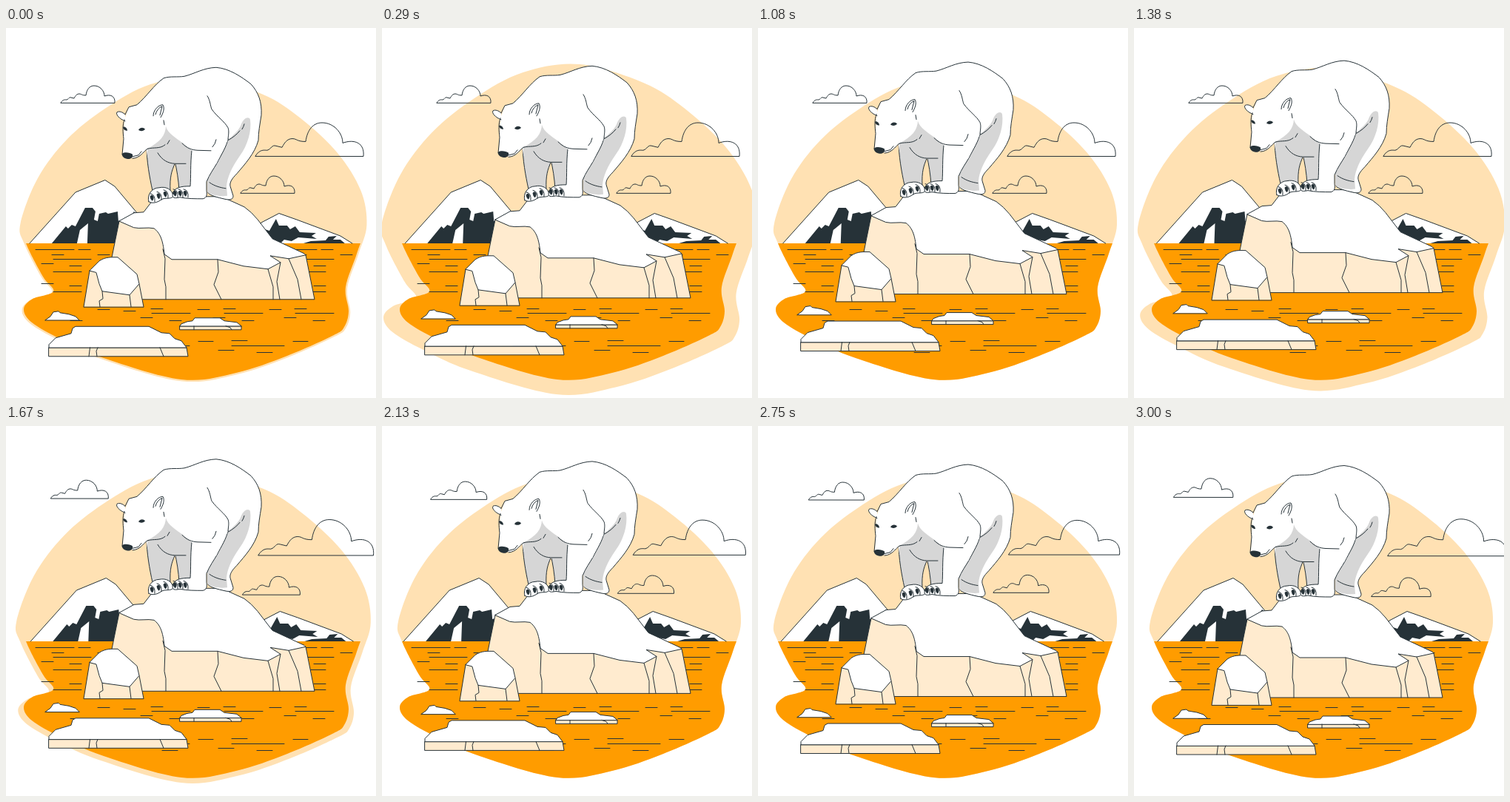
An HTML page for the animation above (3040 ms loop, 500 px wide and 500 px high).

```html
<!DOCTYPE html>
<html lang="en">
<head>
<meta charset="utf-8">
<title>Polar bear on melting ice</title>
<style>
html, body { margin: 0; width: 100%; height: 100%; overflow: hidden; background: #fff; }
svg { display: block; width: 100vw; height: 100vh; }
path { stroke-linecap: round; stroke-linejoin: round; }
.pale { fill: #ffe1b3; }
.sea { fill: #ff9c00; }
.ink { fill: #263238; }
.grey { fill: #d6d6d6; }
.line, .snow, .ice, .shade { stroke: #263238; stroke-width: 1; }
.line { fill: none; }
.snow { fill: #fff; }
.ice { fill: #ffebcf; }
.shade { fill: #d6d6d6; }
.bare { stroke: none; }
.cloud { vector-effect: non-scaling-stroke; }
</style>
</head>
<body>
<svg viewBox="0 0 500 500">
  <defs>
    <path id="land"/>
    <path id="puff" class="line cloud" d="M0 23 C3 18 6 19 8 19 C11 18 11 15 14 16 L18 17 C20 13 22 11 25 11 C28 11 28 13 34 13 C35 5 39 0 45 0 C53 0 59 7 59 14 C67 11 74 14 73 23 Z"/>
    <clipPath id="below"><rect y="291" width="500" height="209"/></clipPath>
  </defs>

  <use href="#land" id="blob" class="pale"/>
  <use href="#land" class="sea" clip-path="url(#below)"/>
  <path id="waves" class="line"/>

  <g id="clouds">
    <use href="#puff" transform="translate(74 78)"/>
    <use href="#puff" transform="translate(337 128) scale(2 1.96)"/>
    <use href="#puff" transform="translate(317 200)"/>
  </g>

  <g id="hills">
    <path class="snow" d="M32 291 L94 222 L134 205.500 L147 214 L184 258 L184 291"/>
    <path class="ink" d="M62 291 L81 268 L84 271 L89 266 L94 268 L107 243 L117 243 L121 248 L119 259 L124 261 L126 251 L135 249 L138 251 L151 248 L152 261 L168 256 L173 248 L186 258 V291 H110 L111 264 L100 273 L96 291 Z"/>
    <path class="snow" d="M330 291 L345 263 L369 250.500 L393 259 L452 281 L468 291"/>
    <path class="ink" d="M340 278 L350 272 L356 274 L365 258 L369 267 L380 267 L384 272 L391 268 L397 276 L419 277 L413 281 L420 285 L395 283 L386 288 L376 286 L372 290 H340 Z M402 291 L412 288 L432 287 L436 282 L447 281 L442 286 L452 286 L458 291 Z"/>
  </g>

  <g id="float">
    <path class="ice" d="M153 261 L143 310 V367 H417 L405 307 L300 290 Z"/>
    <path class="snow" d="M153 261 L173 250 L186 249 L196 236 L215 228 H285 L300 232 L322 242 Q332 249 340 259 L360 285 L403 305 L405 307 L382 312 L357 308 L371 317 L354 326 L321 322 L286 313 H224 L214 306 C212 286 208 277 200 271 C191 269 181 272 173 270 Z"/>
    <path class="line" d="M212 299 L215 312 L214 340 L216 350 V367 M286 313 L287 330 L281 347 L291 367 M371 317 L366 343 L370 367 M354 326 L361 350 V367 M382 312 L394 340 L399 367"/>

    <path class="ice" d="M105 377 L113 328 L150 320 L180 346 L186 377 Z"/>
    <path class="snow" d="M113 328 L126 315 C135 309 143 310 151 310 L177 333 L180 346 L167 361 L130 356 L126 346 L122 331 Z"/>
    <path class="line" d="M130 356 L131 366 L126 369 L127 377 M167 361 L169 377"/>

    <path class="ice" d="M58 432 H244 L246 444 H58 Z"/>
    <path class="snow" d="M58 432 V428 L67 419 L88 413 L90 406 L94 403.500 H193 L210 412 L221 413 L228 420 L237 423 L244 432 Z"/>
    <path class="line" d="M113.500 432 L112 444 M124 432 L122 437 L123 444 M208 432 L213 444"/>

    <path class="ice" d="M235 403 H318 V408 H235 Z"/>
    <path class="snow" d="M235 403 L237 400 L245 397 L252 396 L255 392 H289 L295 396 L312 398 L318 403 Z"/>
    <path class="line" d="M254 403 V408 M297 403 L303 405 L305 408"/>
    <path class="snow" d="M53 395 L60 390 L64 384 L71 383 L73 385 L85 387 L94 390 L99 395 Z"/>

    <!-- far legs -->
    <path class="shade" d="M190 160 C190 180 194 202 198 220 L222 220 C221 202 224 193 228 184"/>
    <path class="shade" d="M228 180 C231 192 233 205 234 220 L252 220 V180"/>
    <!-- trunk and hind leg -->
    <path class="snow" d="M177 104 C191 92 199 78 213 68 C222 65 232 67 241 65.500 C255 62 267 54 284 53.500 C302 55 318 66 331 76 C341 87 346 100 345 118 C343 131 341 141 341 152 C336 170 323 184 312 197 C305 204 302 209 303 214 L307 227 C307 232 303 233 296 231.500 C285 229 277 227 273 223 V206 L254 180"/>
    <path class="snow bare" d="M177 104 L290 80 L299 152 L272 205 L250 184 L228 184 L191 174 L189 160 Z"/>
    <path class="grey" d="M330 124 C328 119 321 122 318 130 C315 139 307 145 299 152 L284 184 L272 206 V222 C280 227 290 228 299 227 L298 214 C299 203 304 190 316 173 C327 158 332 139 330 124 Z"/>
    <path class="grey" d="M216 133 C218 142 230 149 239 156 L251 166 V190 L228 184 L191 175 V162 Z"/>
    <path class="line" d="M205 169 C211 179 219 183 228 183.500 H243 M275 209 C282 214 290 216 297 217 M300 152 C307 148 312 144 316 139 M319 137 Q321 134 322 130"/>
    <!-- paws and near leg -->
    <path class="snow" d="M193 235 C190 226 197 216 207 216 C216 214 225 218 226 228 C222 232 215 229 210 232 C205 236 198 238 193 235 Z"/>
    <path class="snow" d="M251 166 C249 184 250 201 249 214 C238 214 226 215 225 226 C225 231 230 230 235 229 C244 231 256 231 266 231 C271 230 272 226 271 220 V208 C275 198 281 190 285 183 C291 171 298 161 300 150"/>
    <path class="snow bare" d="M251 166 L240 156 L262 110 L277 110 L300 135 L300 151 L284 184 Z"/>
    <path class="line" d="M272 92 C276 98 276 105 278 110 C286 121 295 126 300 135 C302 140 300 147 300 151 M238 156 C245 163 251 165 259 165.500 L277 166 M279 161 Q283 157 284 151"/>
    <path id="toes" class="line"/>
    <path id="claws" class="ink"/>
    <!-- head -->
    <path class="snow bare" d="M160 124 L166 107 L177 104 L207 108 L216 132 C216 145 208 155 191 163 C185 169 181 175 171 176 L158 170 L159 150 Z"/>
    <path class="snow" d="M161 126 C153 123 148 117 150 114 C153 112 158 114 161 117"/>
    <path class="line" d="M161 117 L166 107 L177 104 M160 124 C157 132 158 141 159 150 L157 171 M171 176.500 C181 176 185 168 191 163.500 C200 161 208 164 215 158 M218 157 L221 152 M171 174 L179 172 L183 167"/>
    <path class="snow" d="M199 119 C199 111 206 104 212 104 C215 109 212 116 209 121"/>
    <path class="line" d="M202 117 Q204 109 211 106 L208 118 M213 125 L214 131"/>
    <path class="ink" d="M157 170 C161 167 168 169 171 171 C172 176 168 178 163 177 C159 176 156 173 157 170 Z M158 134 C161 133 164 136 164 139 C161 139 158 137 158 134 Z M179 138 C181 134 186 134 188 137 C186 140 181 140 179 138 Z"/>
  </g>
</svg>
<script>
const byId = id => document.getElementById(id);
const setPath = (id, d) => byId(id).setAttribute('d', d);

// closed smooth curve through key points
function smooth(text) {
  const pts = text.split(' ').map(s => s.split(',').map(Number));
  const n = pts.length;
  const get = i => pts[(i + n) % n];
  const handle = (i, sign) => get(i).map((v, k) => v + sign * (get(i + 1)[k] - get(i - 1)[k]) / 6);
  return `M${pts[0]}` + pts.map((_, i) =>
    `C${handle(i, 1)} ${handle(i + 1, -1)} ${get(i + 1)}`).join('') + 'Z';
}
setPath('land', smooth('22,264 45,204 84,152 136,110 196,78 266,68 345,91 396,123 446,170 ' +
  '477,220 485,266 474,305 459,350 463,383 457,404 443,415 380,443 311,466 237,475 ' +
  '132,446 73,420 35,398 24,380 36,366 64,356 50,336 27,291'));

// each motif is a few dashes (dx, dy, length) repeated at several places
const dash = (x, y, w) => `M${x} ${y + .5}h${w}`;
const repeat = (motif, places) => places.map(([x, y]) =>
  motif.map(([dx, dy, w]) => dash(x + dx, y + dy, w)).join('')).join('');
const horizon = [[0, 0, 52], [58, 0, 16], [22, 7, 16], [84, 7, 16], [24, 13, 51]];
const bank = [[0, 0, 16], [38, 3, 16], [16, 11, 38]];
const middle = [[14, 0, 16], [15, 6, 52], [0, 12, 16], [39, 16, 16]];
const front = [[0, 6, 71], [34, 15, 21], [83, 0, 20]];
setPath('waves',
  repeat(horizon, [[40, 299], [368, 299]]) +
  repeat(bank, [[48, 318], [48, 345], [378, 318], [378, 345]]) +
  repeat(middle, [[182, 379], [280, 379], [376, 379]]) +
  repeat(front, [[177, 423], [305, 423]]) +
  repeat([[0, 0, 16]], [[124, 380], [159, 382], [259, 380], [356, 380], [87, 395]]) +
  repeat([[0, 0, 21]], [[305, 422], [287, 435]]));

// three toes on each front paw
const toes = [0, 1, 2].flatMap(i => [[197 + 9 * i, 230 - 2.5 * i], [228 + 7 * i, 224]]);
setPath('claws', toes.map(([x, y]) =>
  `M${x - 2.5} ${y - 2}q2.500 -4 5 0q.5 4 -2 6q-2.500 -2 -3 -6z`).join(''));
setPath('toes', toes.map(([x, y]) => `M${x - 2} ${y - 6}q7 1 6 11`).join(''));

// motion over one cycle, p from 0 to 1
const tent = (p, peak, rise, fall) =>
  Math.max(0, 1 - (p < peak ? (peak - p) / rise : (p - peak) / fall));
const beat = p => p < 0 ? 1 : 1 + .1 * (tent(p, .1, .1, .2) + tent(p, .5, .1, .1));
const bob = p => -10 * tent(p, .5, .5, .5);

// swings grow towards the middle, then mirror back
const swings = [0, -1, 2, -4, 4, -4, 4];
function shake(p) {
  const s = 10 * Math.min(p, 1 - p), i = Math.floor(s);
  return swings[i] + (swings[i + 1] - swings[i]) * (s - i);
}

const move = (id, value) => byId(id).setAttribute('transform', value);
const zoom = (x, y, s) => `translate(${x} ${y}) scale(${s}) translate(${-x} ${-y})`;

const LOOP = 3040, TICK = 1000 / 24, LEAD = 32, CYCLE = 3000;

function draw(ms) {
  const t = Math.floor((ms % LOOP) / TICK + .12) * TICK;
  const p = Math.min(t + LEAD, CYCLE) / CYCLE;
  move('blob', zoom(253.5, 265.5, beat(p)));
  move('clouds', zoom(278.5, 150.5, beat(p - .5)));
  move('hills', `translate(${shake(p)} 0)`);
  move('float', `translate(0 ${bob(p)})`);
}

const start = performance.now();
function tick() {
  draw(performance.now() - start);
  requestAnimationFrame(tick);
}
tick();
</script>
</body>
</html>
```
